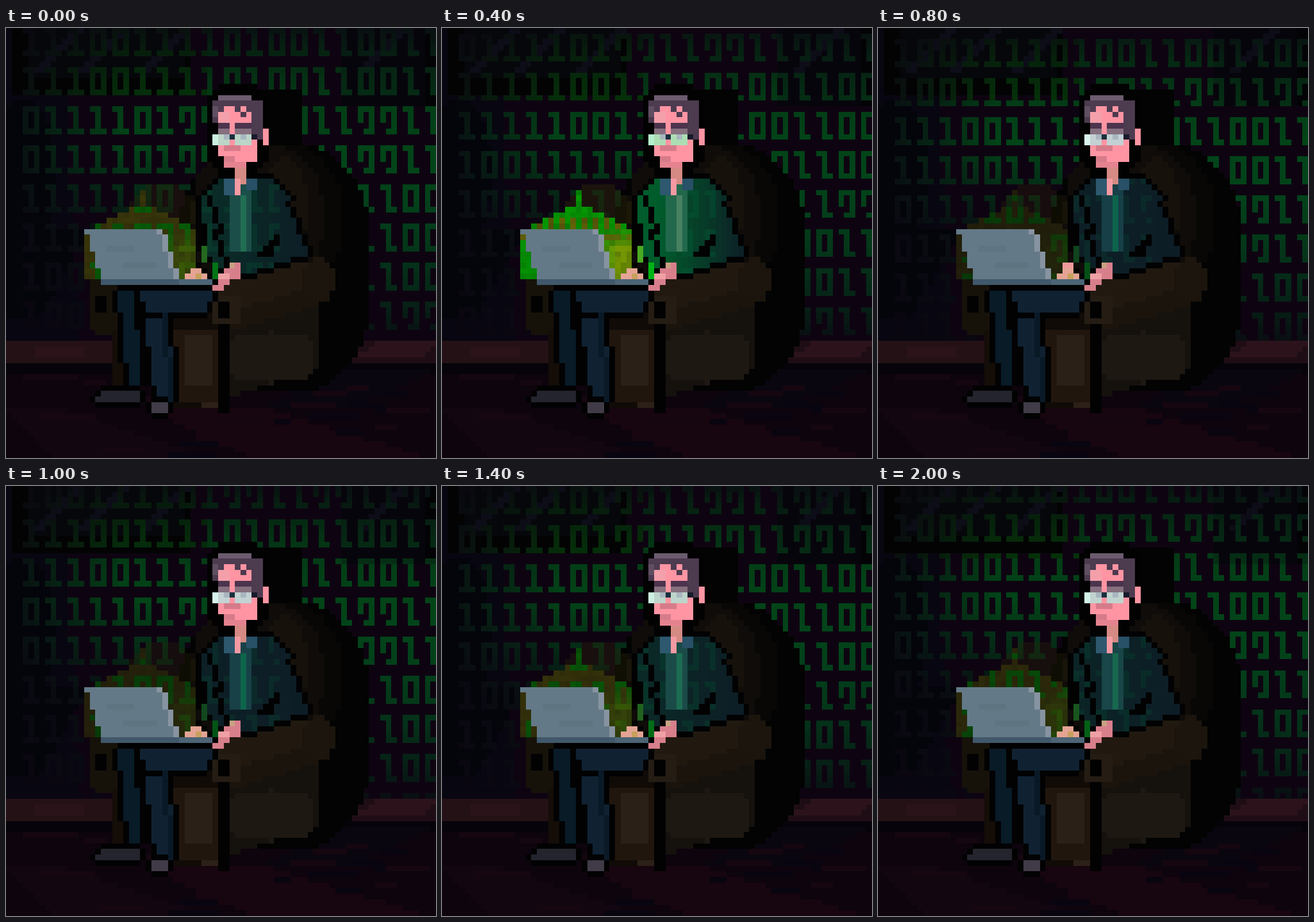
An HTML page with a canvas for the animation above (2.2 s loop, 748 by 748 pixels).

```html
<!DOCTYPE html>
<html lang="en">
<head>
<meta charset="utf-8">
<title>Night shift</title>
<style>
  html, body { margin: 0; width: 100%; height: 100%; overflow: hidden; background: #000; }
  canvas { display: block; width: 100vw; height: 100vh; image-rendering: pixelated; }
</style>
</head>
<body>
<canvas width="77" height="77"></canvas>
<script>
const SIZE = 77, STEP = 200, STEPS = 11, BLACK = '#020203';
const ctx = document.querySelector('canvas').getContext('2d');

const STREAM = '00111101001100110011001100';
const GLYPHS = {
  0: '####.##.##.####',
  1: '##..#..#..#.###',
  l: '##..#..#..#..##',
  9: '####.##.#..#.##'
};

const mod = (a, b) => ((a % b) + b) % b;
const clamp = v => Math.max(0, Math.min(1, v));
const lerp = (a, b, t) => a + (b - a) * t;
const noise = (x, y) => mod(Math.sin(x * 12.99 + y * 78.23) * 4375.85, 1);
const blend = (a, b, t) => a.map((v, i) => Math.round(lerp(v, b[i], t)));
const mix = (a, b, t) => `rgb(${blend(a, b, t)})`;

// Screen light: a slow swell with one bright flash
const light = step => .3 + .15 * Math.cos(step * Math.PI / 4) + .7 * Math.exp(-((step - 2) ** 2));

function rect(color, x, y, w = 1, h = 1) {
  ctx.fillStyle = color;
  ctx.fillRect(x, y, w, h);
}

// Shapes are lists of cells. A trap runs top to bottom, a slab left to right.
function trap(y0, y1, l0, r0, l1, r1) {
  const cells = [];
  for (let y = y0; y < y1; y++) {
    const t = (y + .5 - y0) / (y1 - y0), right = Math.round(lerp(r0, r1, t));
    for (let x = Math.round(lerp(l0, l1, t)); x < right; x++) cells.push([x, y]);
  }
  return cells;
}

const slab = (...edges) => trap(...edges).map(([y, x]) => [x, y]);

function oval(cx, cy, rx, ry, power = 2) {
  const cells = [];
  for (let y = Math.floor(cy - ry); y < cy + ry; y++)
    for (let x = Math.floor(cx - rx); x < cx + rx; x++)
      if (Math.abs((x + .5 - cx) / rx) ** power + Math.abs((y + .5 - cy) / ry) ** power <= 1) cells.push([x, y]);
  return cells;
}

function fill(color, cells) {
  for (const [x, y] of cells) rect(typeof color === 'function' ? color(x, y) : color, x, y);
}

function outlined(color, cells) {
  for (const [x, y] of cells) { rect(BLACK, x - 1, y, 3, 1); rect(BLACK, x, y - 1, 1, 3); }
  fill(color, cells);
}

// True where a binary digit covers the cell
function lit(x, y, step) {
  const scroll = y - 28 + 10 * step, row = mod(Math.floor(scroll / 7), 8), pair = row >> 1;
  const gy = mod(scroll, 7), gx = mod(x - 3, 4), col = Math.floor((x - 3) / 4);
  if (gy > 4 || gx > 2 || col < 0) return false;
  const i = col - 5 + 4 * (pair & 1) + 2 * (pair >> 1);
  let digit = STREAM[i] || '1';
  if (digit === '1' && i >= 10) digit = 'l';
  if (digit === '0' && i >= 8 && (row === 3 || row > 5)) digit = '9';
  return GLYPHS[digit][gy * 3 + gx] === '#';
}

function drawRoom() {
  rect('#0e0411', 0, 0, 77, 56);
  fill('#080610', trap(0, 56, 0, 10, 0, 13));
  fill('#04040b', oval(3, 26, 6, 13));
  fill('#04040b', trap(36, 52, 0, 15, 0, 6));
  rect('#030304', 1, 0, 32, 12);
  rect('#06070b', 4, 0, 28, 9);
  rect('#07050c', 60, 0, 17, 14);
  rect('#030306', 75, 0, 2, 14);
  for (const x of [4, 12, 23, 62]) fill('#0d0d18', trap(0, 8, x + 9, x + 11, x, x + 2));
}

function drawDigits(step) {
  for (let y = 0; y < 56; y++) for (let x = 3; x < SIZE; x++) {
    if (!lit(x, y, step)) continue;
    let v = 1 - ((y - 22) / (y < 22 ? 25 : 36)) ** 2;
    v *= Math.min(1, (x + 3) / 24);
    if (x < 34 && y > 20) v *= Math.max(.25, 1 - (y - 20) / 22);
    if (x >= 60 && y < 14) v *= .75;
    rect(mix([10, 5, 16], y < 13 && x < 36 ? [4, 56, 8] : [2, 68, 20 + y / 5], clamp(v)), x, y);
  }
}

function drawFloor() {
  rect('#0d040d', 0, 56, 77, 21);
  rect('#241116', 0, 56, 21, 4);
  rect('#2a1319', 5, 57, 9, 2);
  rect('#1f0d15', 60, 56, 17, 4);
  fill('#2c131b', trap(56, 59, 67, 77, 62, 74));
  rect('#07030a', 0, 60, 77, 2);
  fill('#0a0610', trap(61, 68, 60, 77, 46, 62));
  fill('#17050f', trap(68, 77, 24, 46, 44, 76));
  fill('#120611', trap(68, 77, 0, 10, 8, 36));
  for (let i = 0; i < 24; i++)
    rect(i % 2 ? '#15060f' : '#090510', Math.floor(noise(i, 3) * 72), 62 + i % 15, 3 + i % 8, 1);
}

function drawChair() {
  rect('#020302', 43, 11, 10, 20);
  fill('#020302', oval(48, 43, 17.5, 22.5, 2.6));
  fill('#080706', oval(51, 34, 9.5, 13));
  fill('#0f0c09', oval(45, 34, 11.8, 13, 2.5));
  fill('#17110c', oval(50, 32, 4, 9));
  // Far arm and leg
  fill('#16120a', oval(18, 49, 3.2, 6, 3));
  rect(BLACK, 16, 48, 2, 3);
  rect('#140d08', 19, 54, 2, 11);
  // Seat and front
  rect('#100b07', 28, 50, 11, 18);
  rect('#21160d', 30, 54, 8, 13);
  rect('#2b2017', 32, 55, 5, 9);
  rect('#2c2018', 35, 67, 3, 1);
  // Side and near arm
  fill('#15110d', slab(40, 56, 53, 66, 47, 61));
  fill('#1e1813', oval(47.5, 59, 7.5, 4.5, 3));
  fill('#1a140d', slab(38, 58, 47, 55, 42, 49));
  fill('#211910', slab(38, 57, 46, 51, 41, 46));
  fill('#1b150d', oval(56, 45, 3, 4));
  rect('#251d14', 37, 48, 5, 5);
  rect(BLACK, 38, 49, 2, 3);
  rect(BLACK, 38, 53, 2, 16);
}

function drawGlow(step, g) {
  fill(`rgba(46,40,10,${.25 + g * .2})`, oval(28, 33, 6, 5));
  for (let x = 14; x < 34; x++) {
    const top = Math.round(31 + Math.abs(x - 24) / 2) - (x === 24 ? 2 : 0);
    for (let y = top; y < 45; y++) {
      const near = clamp((x - 26) / 5) * clamp((y - 35) / 4), shade = .75 + noise(x, y) * .25;
      const stripe = x % 2 && (y === 34 || y === 35);
      const on = lit(x, y, step) || (g > .8 && !stripe && y !== 37);
      rect(on
        ? mix([8, 40, 10], [5 + near * 115, 152, 3], clamp(g * shade))
        : mix([22, 18, 11], [98, 98 + near * 40, 8], clamp(g * shade)), x, y);
    }
  }
}

function drawLegs() {
  outlined('#081b27', trap(47, 64, 20, 24, 22, 24));
  outlined('#102232', trap(47, 67, 24, 29, 27, 30));
  outlined('#102232', trap(47, 51, 24, 37, 25, 36));
  fill('#0a1926', trap(51, 67, 28, 29, 29, 30));
  rect(BLACK, 23, 47, 1, 7);
  outlined('#24242e', trap(65, 67, 18, 24, 15, 24));
  outlined('#403b47', trap(67, 69, 26, 29, 26, 29));
}

function drawJacket(step, g) {
  const cloth = (x, y) => {
    const green = clamp(g * g * (1.25 - (x - 34) / 16));
    const base = blend([13, 29, 38], [0, 92, 42], green);
    return mix(base, [0, 92, 52], lit(x, y, step) && x < 49 ? .15 + g * .2 : 0);
  };
  outlined(cloth, [
    ...trap(27, 31, 38, 47, 35, 51),
    ...trap(31, 40, 35, 50, 35, 54),
    ...trap(40, 44, 35, 55, 39, 44)
  ]);
  // Shirt, tie and collar
  fill(mix([21, 55, 70], [34, 104, 76], g), trap(27, 40, 40, 44, 40, 44));
  rect(mix([0, 94, 70], [72, 128, 98], g), 42, 30, 1, 10);
  rect('#2d586e', 39, 27, 2, 3);
  rect('#285066', 43, 27, 2, 2);
  // Folds
  fill(BLACK, trap(30, 37, 36, 37, 38, 39));
  fill(BLACK, trap(36, 43, 37, 38, 39, 40));
  rect(BLACK, 35, 35, 1, 7);
  fill(BLACK, trap(37, 41, 48, 49, 44, 48));
  rect(mix([4, 48, 28], [75, 170, 35], g), 35, 39, 1, 3);
  rect(mix([4, 60, 24], [0, 180, 20], g), 37, 42, 1, 3);
}

function drawHead(g) {
  const skin = '#ff95a3', hair = '#4d3b50', brow = '#4c344d', shadow = '#d67b8a';
  const lens = mix([200, 207, 218], [172, 222, 180], g);
  fill(BLACK, oval(41.5, 18, 5.5, 8, 4));
  // Neck
  rect('#d58a84', 41, 25, 2, 3);
  rect('#f49aa3', 41, 27, 1, 3);
  // Face and hair
  rect(hair, 37, 13, 9, 4);
  rect(hair, 44, 14, 2, 6);
  rect('#6c5c70', 38, 12, 6, 1);
  rect('#604e62', 37, 14, 1, 2);
  rect(skin, 38, 15, 6, 8);
  rect(skin, 39, 14, 5, 1);
  rect(skin, 39, 22, 6, 2);
  rect(skin, 44, 20, 1, 4);
  rect(skin, 46, 18, 1, 3);
  rect('#f3a0ab', 38, 15, 2, 2);
  for (const [x, y] of [[41, 14], [42, 15], [43, 14]]) rect(hair, x, y);
  // Brows and glasses
  for (const [x, w] of [[38, 2], [41, 3]]) {
    rect(brow, x, 17, w, 1);
    rect('#86707f', x, 18, w, 1);
    rect(lens, x, 19, w, 2);
    rect('#a9b6bf', x + 1, 19);
  }
  rect(mix([223, 242, 242], [180, 240, 205], g), 37, 19, 1, 2);
  rect('#172f3d', 40, 19);
  rect('#171b2b', 44, 19);
  // Mouth and chin
  rect(shadow, 39, 21, 3, 1);
  rect(shadow, 39, 23, 2, 1);
  rect('#e4838f', 39, 24, 4, 1);
}

function drawLaptop() {
  fill('#8793a0', trap(36, 45, 27, 28, 30, 31));
  fill('#647987', trap(36, 45, 14, 27, 17, 30));
  rect('#5f7481', 18, 39, 5, 1);
  rect('#5f7481', 21, 42, 6, 1);
  rect('#40586a', 17, 45, 14, 1);
  rect('#4c6476', 31, 45, 6, 1);
  rect(BLACK, 20, 46, 17, 1);
}

function drawHands(step) {
  fill('#e5a494', trap(43, 45, 33, 35, 32, 36));
  if (step && step % 4 === 0) rect('#f09a9c', 33, 42, 2, 1);
  rect('#c8a05c', 34, 44);
  fill('#d87f8c', trap(42, 47, 40, 42, 37, 39));
  rect('#d87f8c', 40, 43, 2, 2);
  rect('#efa0a4', 38, 44, 2, 1);
  rect('#c9a083', 40, 42);
}

function draw(step) {
  const g = light(step);
  drawRoom();
  drawDigits(step);
  drawFloor();
  drawChair();
  drawGlow(step, g);
  drawLegs();
  drawJacket(step, g);
  drawHead(g);
  drawLaptop();
  drawHands(step);
}

let shown = 0;
function tick(now) {
  const step = Math.floor(now / STEP) % STEPS;
  if (step !== shown) draw(shown = step);
  requestAnimationFrame(tick);
}
draw(shown);
requestAnimationFrame(tick);
</script>
</body>
</html>
```
